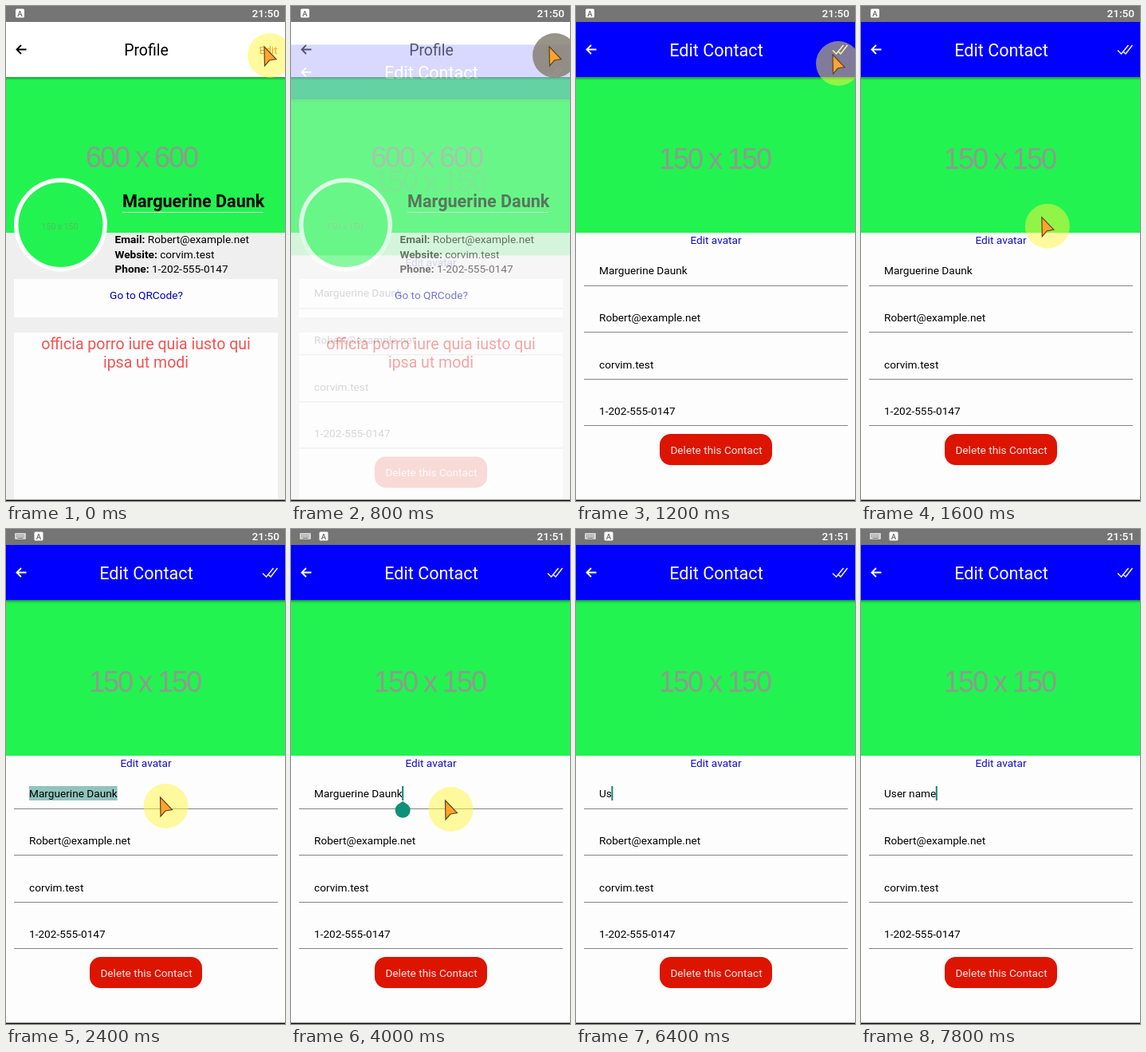
These frames come from a looping animation (350x620 px, 8 s). An HTML page:

```html
<!DOCTYPE html>
<html lang="en">
<head>
<meta charset="utf-8">
<title>Edit contact</title>
<style>
  html, body { margin: 0; width: 100%; height: 100%; overflow: hidden; background: #fdfdfd; }
  svg { display: block; width: 350px; height: 620px; }
  text { font: 13.65px Roboto, sans-serif; white-space: pre; }
  .title { font-size: 21.6px; }
  .medium { font-size: 19.5px; }
  .mid { text-anchor: middle; }
  .bold { font-weight: bold; }
  .picture { font: 36px "Liberation Sans", sans-serif; letter-spacing: -2px; fill: #8f9a8f; }
  .stroke { fill: none; stroke-width: 1.8; }
</style>
</head>
<body>
<svg viewBox="0 0 350 620">
  <defs>
    <linearGradient id="shade" x2="0" y2="1">
      <stop stop-opacity=".35"/><stop offset="1" stop-opacity="0"/>
    </linearGradient>
    <g id="hero">
      <rect y="89" width="350" height="195" fill="#22f350"/>
      <rect y="89" width="350" height="4" fill="url(#shade)"/>
    </g>
    <path id="back" class="stroke" d="M25.500 54.500H13.500M19 49l-5.500 5.500 5.500 5.500"/>
  </defs>

  <rect width="350" height="620" fill="#fff"/>

  <g id="profile">
    <rect y="20" width="350" height="600" fill="#efefef"/>
    <rect y="20" width="350" height="69" fill="#fff"/>
    <use href="#hero"/>
    <use href="#back" stroke="#000"/>
    <text class="medium mid" x="176" y="62">Profile</text>
    <text id="editLink" x="317.500" y="60" fill="#f4511e">Edit</text>
    <text class="picture" x="100" y="202">600 x 600</text>
    <circle cx="68.500" cy="274" r="58.500" fill="#fff"/>
    <circle cx="68.500" cy="274" r="53" fill="#22f350"/>
    <text class="mid" x="67.500" y="280" fill="#58b868" style="font-size:10.500px">150 x 150</text>
    <text class="title bold" x="146" y="252" data-field="name"></text>
    <path d="M146 258.500H323" stroke="#c8f5d0"/>
    <text x="136.500" y="297"><tspan class="bold">Email:</tspan> <tspan data-field="email"></tspan></text>
    <text x="136.500" y="315.500"><tspan class="bold">Website:</tspan> <tspan data-field="site"></tspan></text>
    <text x="136.500" y="334"><tspan class="bold">Phone:</tspan> <tspan data-field="phone"></tspan></text>
    <path d="M10 342H341V390H10zM10 409H341V620H10z" fill="#fdfdfd"/>
    <text class="mid" x="176" y="367" fill="#0000b4">Go to QRCode?</text>
    <g class="mid" fill="#f05454">
      <text class="medium" x="175.500" y="430">officia porro iure quia iusto qui</text>
      <text class="medium" x="175.500" y="453">ipsa ut modi</text>
    </g>
  </g>

  <g id="editor">
    <rect y="20" width="350" height="600" fill="#fdfdfd"/>
    <rect y="20" width="350" height="69" fill="#00f"/>
    <use href="#hero"/>
    <use href="#back" stroke="#fff"/>
    <text class="title mid" x="176" y="63" fill="#fff">Edit Contact</text>
    <path class="stroke" d="M322 55.500l4.500 4.500 9-11M329.500 57.500l2.500 2.500 8.500-11" stroke="#fff" style="stroke-width:1.400"/>
    <text class="picture bold" x="104" y="203.500">150 x 150</text>
    <text class="mid" x="175.500" y="298" fill="#1010d0">Edit avatar</text>
    <path d="M10 350.500H341M10 408.500H341M10 467.500H341M10 525.500H341" stroke="#858585"/>
    <rect id="selection" x="29" y="322" height="18" fill="#91c4bd"/>
    <text id="nameInput" x="29" y="336"></text>
    <text x="29" y="395" data-field="email"></text>
    <text x="29" y="453.500" data-field="site"></text>
    <text x="29" y="512" data-field="phone"></text>
    <rect id="caret" y="322" width="2" height="18" fill="#128577"/>
    <path id="handle" d="M0 341l6.700 4.500a9.500 9.500 0 1 1-13.400 0z" fill="#0f9078"/>
    <rect x="105" y="536" width="141" height="39" rx="14" fill="#dc1400"/>
    <text class="mid" x="176" y="561" fill="#ffe8e4">Delete this Contact</text>
  </g>

  <rect width="350" height="20" fill="#757575"/>
  <g id="keyboard" fill="#d0d0d0">
    <rect x="11" y="5" width="14" height="8" rx="1"/>
    <path d="M13 7.500H23M13 9.500H23" stroke="#858585" stroke-dasharray="1 1"/>
    <path d="M14.500 11.500H21.500" stroke="#757575"/>
  </g>
  <g id="letterIcon">
    <rect x="12" y="3.500" width="11" height="11" rx="1.500" fill="#fff"/>
    <text class="mid bold" x="17.500" y="12.500" fill="#757575" style="font-size:9.500px">A</text>
  </g>
  <text id="clock" x="308.500" y="14" fill="#fff" style="font-weight:500"></text>

  <g id="pointer">
    <circle id="halo" r="28"/>
    <path d="M-7-11L8 4.500-.500 6-6.500 13z" fill="#ffa42e" stroke="#5d431f" stroke-width="1.200"/>
  </g>
  <rect y="618.500" width="350" height="1.500" fill="#111"/>
</svg>

<script>
const LOOP = 8000, STEP = 200;
const contact = {
  name: 'Marguerine Daunk',
  email: 'Robert@example.net',
  site: 'corvim.test',
  phone: '1-202-555-0147'
};
const typed = 'User name';
const pointerPath = [[0, 331, 62], [1000, 331, 62], [1200, 329, 72], [1800, 200.5, 347], [3000, 200.5, 347], [3600, 200.5, 351]];
const typing = [[6000, 1], [6400, 2], [6600, 3], [6800, 5], [7000, 7], [7200, 8], [7400, 9]];

const $ = id => document.getElementById(id);
const clamp = v => Math.min(1, Math.max(0, v));
const between = (t, from, to) => t >= from && t < to;
const show = (id, visible) => $(id).setAttribute('visibility', visible ? 'visible' : 'hidden');
const move = (id, x, y) => $(id).setAttribute('transform', `translate(${x} ${y})`);

for (const el of document.querySelectorAll('[data-field]')) el.textContent = contact[el.dataset.field];

function pointerAt(t) {
  const next = pointerPath.findIndex(key => key[0] > t);
  if (next < 0) return pointerPath.at(-1).slice(1);
  const [t0, x0, y0] = pointerPath[next - 1], [t1, x1, y1] = pointerPath[next];
  const p = (t - t0) / (t1 - t0), ease = p * p * (3 - 2 * p);
  return [x0 + (x1 - x0) * ease, y0 + (y1 - y0) * ease];
}

function nameAt(t) {
  if (t < 5400) {
    const erased = t < 4200 ? 0 : 1 + Math.round((t - 4200) / STEP * 2.8);
    return contact.name.slice(0, contact.name.length - erased);
  }
  const key = typing.findLast(([start]) => t >= start);
  return typed.slice(0, key ? key[1] : 0);
}

function drawInput(t) {
  const name = nameAt(t), input = $('nameInput');
  input.textContent = name || 'name...';
  input.setAttribute('fill', name ? '#000' : '#999');
  const width = input.getComputedTextLength();
  const caretX = name ? 29 + width : 29;
  const selected = between(t, 2400, 3400);
  $('selection').setAttribute('width', width);
  show('selection', selected);
  $('caret').setAttribute('x', caretX - .5);
  show('caret', t >= 2000 && !selected && !between(t, 5600, 6000) && !between(t, 7600, 7800));
  move('handle', caretX + .5, 0);
  show('handle', between(t, 2000, 2400) || between(t, 3400, 4200));
}

function draw(t) {
  const p = clamp((t - 620) / 470);
  $('profile').setAttribute('opacity', 1 - p);
  $('editor').setAttribute('opacity', p * p);
  move('editor', 0, 46 * (1 - p));
  $('editLink').setAttribute('opacity', between(t, 600, 1200) ? .3 : 1);
  drawInput(t);

  show('keyboard', t >= 2000);
  move('letterIcon', t >= 2000 ? 23.5 : 0, 0);
  $('clock').textContent = t < 3400 ? '21:50' : '21:51';

  move('pointer', ...pointerAt(t));
  $('halo').setAttribute('fill', between(t, 800, 1200) ? 'rgba(135,130,115,.85)' : 'rgba(255,245,60,.5)');
  show('pointer', t < 5800);
}

function tick() {
  draw(Math.floor(performance.now() % LOOP / STEP) * STEP);
  requestAnimationFrame(tick);
}
tick();
</script>
</body>
</html>
```
